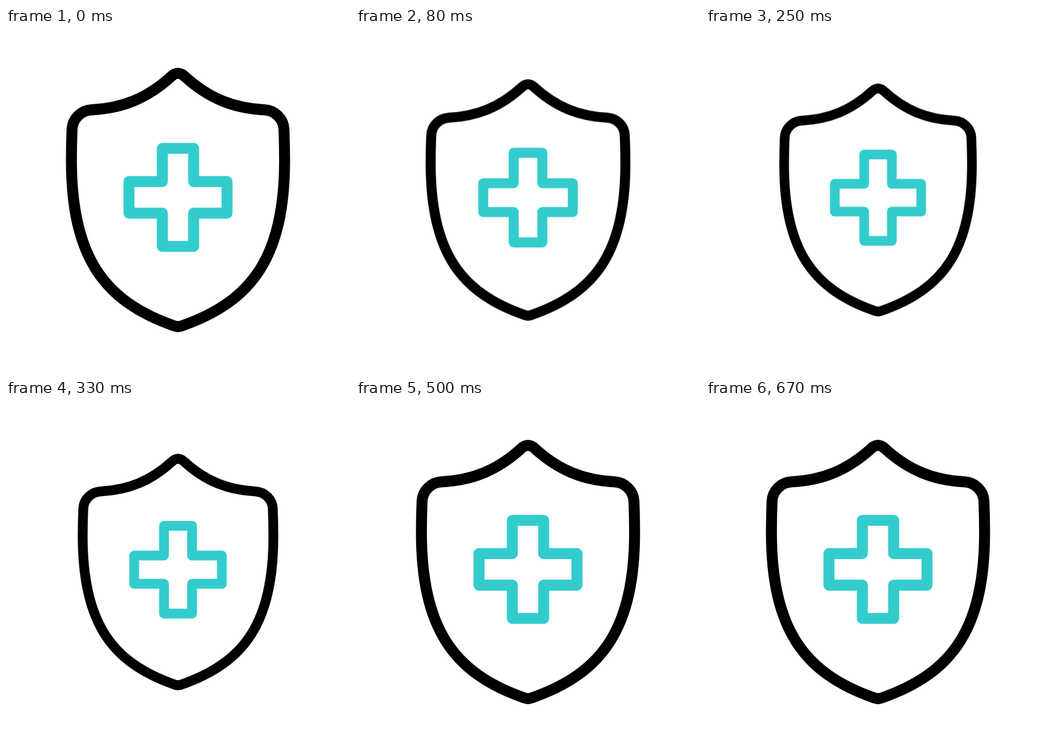
An HTML page for the animation above (1540 ms loop, 640 by 640 pixels).

```html
<!DOCTYPE html>
<html lang="en">
<head>
<meta charset="utf-8">
<title>Pulsing shield</title>
<style>
  html, body { margin: 0; width: 100%; height: 100%; overflow: hidden; background: #fff; }
  svg { display: block; width: 100%; height: 100%; }
  #icon {
    fill: none;
    stroke-width: 20.4;
    stroke-linecap: round;
    stroke-linejoin: round;
    transform-box: view-box;
    transform-origin: 320px 320px;
  }
</style>
</head>
<body>
<svg viewBox="0 0 640 640">
  <g id="icon">
    <g stroke="#000">
      <path id="half" d="M320 84.4C315.8 84.4 311.7 86.2 308.5 89.3C262 132 215 149.5 159 152.3
        C139.5 153.4 123.6 168.9 122.9 188.5C122 210 121.7 228 121.7 246
        C121.7 423 180 508 313.5 554.3Q316.7 555.5 320 555.5"/>
      <use href="#half" transform="translate(640 0) scale(-1 1)"/>
    </g>
    <path stroke="#33cccc" d="M290.8 223.9H349.2V285.8H411.2V344.5H349.2V406.4H290.8V344.5H228.8V285.8H290.8Z"/>
  </g>
</svg>
<script>
  const LOOP = 1540;
  const LAST = 16;
  const POWER = 2.5;

  // Each pulse shrinks from start to low, then returns to full size at end.
  const pulses = [
    { start: 0, low: 5, end: 12, depth: 0.12 },
    { start: 12, low: 14, end: 16, depth: 0.05 }
  ];

  function scaleAt(step) {
    const p = pulses.find(q => step <= q.end);
    const span = step < p.low ? p.low - p.start : p.end - p.low;
    const away = Math.abs(step - p.low) / span;
    return 1 - p.depth * (1 - away ** POWER);
  }

  // 24 steps a second, on a 10 ms clock
  const startOf = step => Math.round(step * 100 / 24) * 10;

  const keys = [];
  for (let i = 0; i <= LAST; i++) {
    keys.push({
      offset: startOf(i) / LOOP,
      transform: `scale(${scaleAt(i)})`,
      easing: 'steps(1, end)'
    });
  }
  keys.push({ offset: 1, transform: 'scale(1)' });

  document.getElementById('icon').animate(keys, { duration: LOOP, iterations: Infinity });
</script>
</body>
</html>
```
